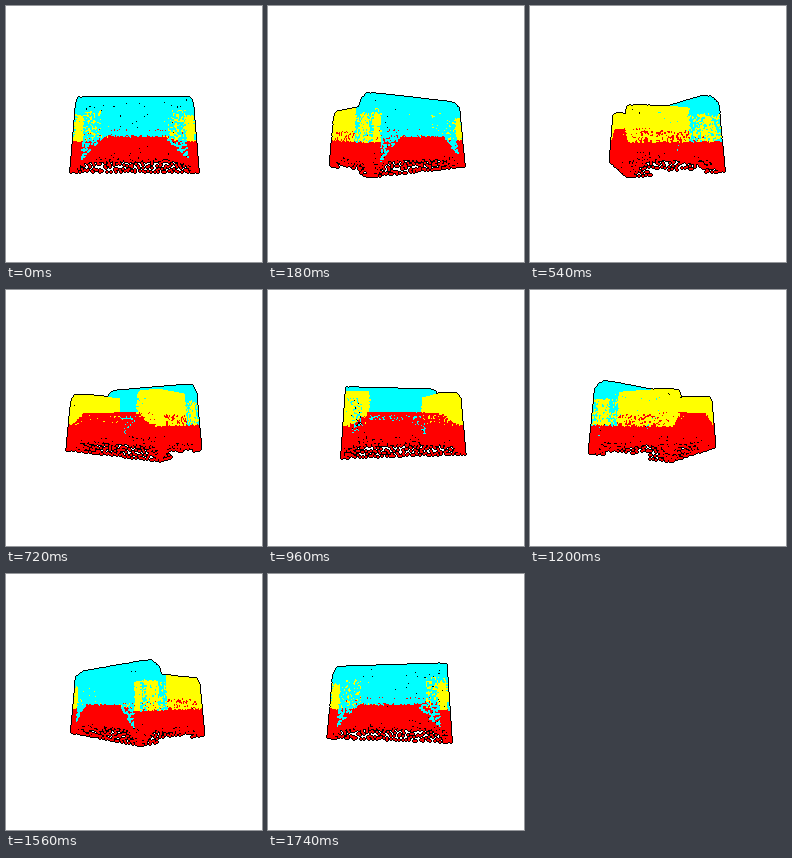
Animation of 256x256 px, one loop 1.8 s. Source, as a matplotlib script:

```python
import numpy as np
import matplotlib.pyplot as plt
from matplotlib.animation import FuncAnimation

SIZE, FRAMES, LOOP_MS = 256, 30, 1800
CAMERA = 240
HALF_W, HALF_D, BOTTOM = 52.5, 41, -31
ARM_IN, ARM_TOP, SEAT_TOP = 32, 21.8, 4.3
BACK_Z, BACK_R, BACK_UP = 27, 11, 21.3
CYAN, YELLOW, RED = range(3)
COLORS = np.array([[0, 255, 255], [255, 255, 0], [255, 0, 0],
                   [0, 0, 0], [255, 255, 255]], np.uint8)
BLACK, WHITE = 3, 4

rng = np.random.default_rng(7)
points, labels = [], []


def patch(u0, u1, v0, v1, step):
    """Jittered lattice covering a rectangle."""
    u, v = np.meshgrid(np.arange(u0, u1 + step / 2, step),
                       np.arange(v0, v1 + step / 2, step))
    u = u + rng.uniform(-.45, .45, u.shape) * step
    v = v + rng.uniform(-.45, .45, v.shape) * step
    return np.clip(u.ravel(), u0, u1), np.clip(v.ravel(), v0, v1)


def taper(up):
    return 4.3 * (up - BOTTOM) / 64


def add(x, up, z, label, keep=True):
    x, up, z, label, keep = np.broadcast_arrays(x, up, z, label, keep)
    points.append(np.stack([x, up, z], 1)[keep].astype(float))
    labels.append(label[keep])


def chance(p, like):
    return rng.random(like.shape) < p


def skirt(u, up, half):
    """Thinly covered strip along the bottom."""
    return (up < -20.5) & (np.abs(u) < half - 4 - (up - BOTTOM))


def rounded(u, up, half, top, r):
    du = np.maximum(np.abs(u) - (half - r), 0)
    dv = np.maximum(up - (top - r), 0)
    return np.hypot(du, dv) <= r


def add_side(sign):
    for step, thin in ((1.4, False), (2.7, True)):
        z, up = patch(-HALF_D, HALF_D, BOTTOM, ARM_TOP, step)
        label = np.full(z.shape, YELLOW)
        label[(z > 11) & (z < 21) & chance(.65, z)] = CYAN
        label[(z >= 21) & (z < 35) & chance(.12, z)] = CYAN
        label[(z >= 35) & chance(.6, z)] = CYAN
        label[(z >= 11) & (up > 17)] = CYAN
        label[(up < 3) & (z > -33) & (z < 11) & chance(.3, z)] = RED
        label[up < -6] = RED
        keep = skirt(z, up, HALF_D) == thin
        keep &= (z > 0) | rounded(z, up, HALF_D, ARM_TOP, 5)
        keep &= (np.abs(z) > 22) | (up > -28)
        keep &= (z > -18) | (up < -6) | chance(.75, z)
        add(sign * (HALF_W - taper(up)), up, z * (1 - taper(up) / HALF_D),
            label, keep)

    # end cap of the backrest
    z, up = patch(-BACK_R, BACK_R, ARM_TOP - 3, BACK_UP + BACK_R, 1.4)
    inside = np.hypot(z, np.maximum(up - BACK_UP, 0)) <= BACK_R
    add(sign * (HALF_W - taper(up)), up, BACK_Z + z, CYAN, inside)

    # inner face and top of the arm
    z, up = patch(-HALF_D + 4, 17, -4, ARM_TOP, 1.5)
    add(sign * ARM_IN, up, z, np.where((up < 2) & chance(.5, z), RED, YELLOW))
    x, z = patch(ARM_IN, HALF_W - 5, -HALF_D + 6, 17, 1.8)
    add(sign * x, ARM_TOP, z, YELLOW)


def add_front():
    for step, thin in ((1.6, False), (2.7, True)):
        x, up = patch(-HALF_W, HALF_W, BOTTOM, ARM_TOP, step)
        ax = np.abs(x)
        arm = ax > ARM_IN
        cushion = -6 + 10 * np.clip((48 - ax) / 14, 0, 1)
        label = np.where(arm & (up > cushion), YELLOW, RED)
        keep = skirt(x, up, HALF_W) == thin
        keep &= arm | (up < SEAT_TOP)
        keep &= rounded(ax - 42, up, 10.5, ARM_TOP, 4) | (up < 10)
        keep &= (ax > 47) | (up < -17) | chance(.85, x)
        add(x * (1 - taper(up) / HALF_W), up, -HALF_D + taper(up), label, keep)
    x, z = patch(-ARM_IN, ARM_IN, -HALF_D + 3, 17, 2)
    add(x, SEAT_TOP, z, RED)


def add_back():
    for step, thin in ((1.35, False), (2.7, True)):
        x, up = patch(-HALF_W, HALF_W, BOTTOM, BACK_UP, step)
        ax = np.abs(x)
        bulge = -2 - 1.05 * np.maximum(ax - 26, 0)
        label = np.where(up < bulge, RED, CYAN)
        edge = ax > 45
        label[edge & (up < 16)] = YELLOW
        label[edge & (up < -6)] = RED
        keep = skirt(x, up, HALF_W) == thin
        see_through = (ax > 24) & (ax < 45) & (up < 16)
        keep &= (label != CYAN) | chance(np.where(see_through, .55, .72), x)
        add(x * (1 - taper(up) / HALF_W), up, HALF_D - taper(up), label, keep)

    # rolled top
    x, t = patch(-HALF_W, HALF_W, 0, np.pi * BACK_R, 1.7)
    up = BACK_UP + BACK_R * np.sin(t / BACK_R)
    z = BACK_Z + BACK_R * np.cos(t / BACK_R)
    add(x * (1 - taper(up) / HALF_W), up, z, CYAN,
        rounded(x, up, HALF_W, BACK_UP + BACK_R, 5))

    x, up = patch(-ARM_IN, ARM_IN, SEAT_TOP - 4, BACK_UP, 1.4)
    add(x, up, BACK_Z - BACK_R, CYAN)


for side in (-1, 1):
    add_side(side)
add_front()
add_back()
cloud, tags = np.concatenate(points), np.concatenate(labels)
STAMP = ((0, 0), (1, 0), (0, 1), (1, 1))
NEIGHBOURS = ((1, 0), (-1, 0), (0, 1), (0, -1))


def render(i):
    angle = 2 * np.pi * i / FRAMES
    c, s = np.cos(angle), np.sin(angle)
    x, up, z = cloud.T
    near = z * c - x * s
    scale = CAMERA / (CAMERA - near)
    px = np.floor(128 + scale * (x * c + z * s)).astype(int)
    py = np.floor(128 - scale * up).astype(int)

    order = np.argsort(near)
    depth = np.full((SIZE, SIZE), -1e9)
    image = np.full((SIZE, SIZE), WHITE)
    for dx, dy in STAMP:
        layer = np.full((SIZE, SIZE), -1)
        layer[py[order] + dy, px[order] + dx] = order
        hit = layer >= 0
        hit[hit] = near[layer[hit]] > depth[hit]
        depth[hit] = near[layer[hit]]
        image[hit] = tags[layer[hit]]

    # empty pixels touching the cloud turn black
    solid = image != WHITE
    touch = np.zeros_like(solid)
    for dx, dy in NEIGHBOURS:
        touch |= np.roll(solid, (dy, dx), (0, 1))
    image[touch & ~solid] = BLACK
    return COLORS[image]


fig = plt.figure(figsize=(SIZE / 100, SIZE / 100), dpi=100, facecolor="white")
ax = fig.add_axes([0, 0, 1, 1])
ax.axis("off")
picture = ax.imshow(render(0), interpolation="nearest", aspect="auto")


def update(i):
    picture.set_data(render(i))
    return [picture]


anim = FuncAnimation(fig, update, frames=FRAMES, interval=LOOP_MS / FRAMES,
                     repeat=True, repeat_delay=0, blit=False)
plt.show()
```
